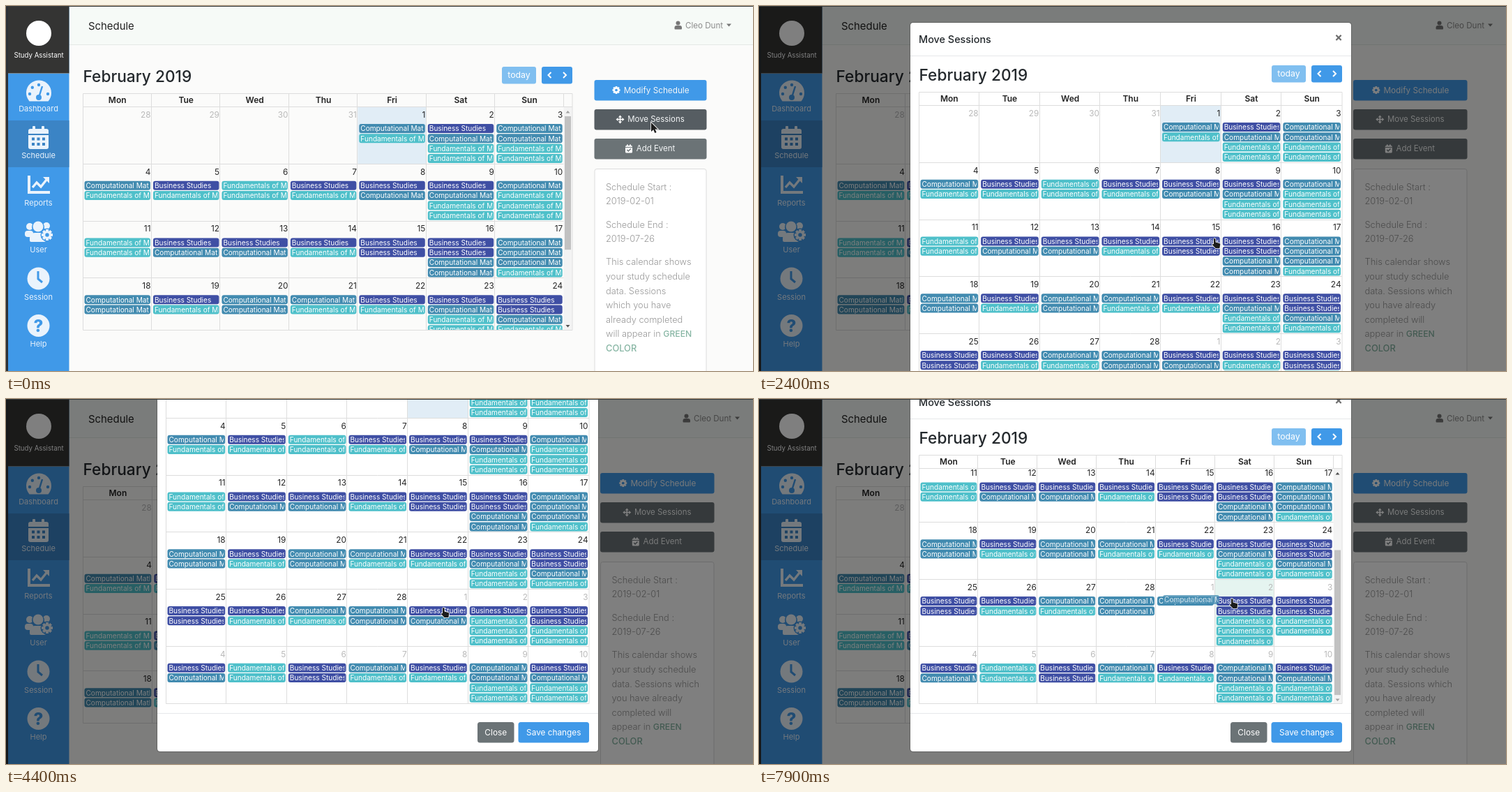
An HTML page with a canvas that plays this animation: 1071x523 px, repeating every 8000 ms.

```html
<!DOCTYPE html>
<html lang="en">
<head>
<meta charset="utf-8">
<title>Study schedule</title>
<style>
html, body { margin: 0; width: 100%; height: 100%; overflow: hidden; background: #fbfbfa; }
canvas { display: block; }
</style>
</head>
<body>
<canvas id="stage" width="1071" height="523"></canvas>
<script>
const ctx = document.getElementById('stage').getContext('2d');
const W = 1071, H = 523, LOOP = 8000, STEP = 100;
const BLUE = '#4099e8', PALE = '#eaf3fc', GREY = '#6b7376', LINE = '#dddddd';

const SUBJECTS = {
  C: ['Computational Mathematics', '#428bb0'],
  B: ['Business Studies', '#3f4fa4'],
  F: ['Fundamentals of Mathematics', '#4fc0ca']
};
const parse = rows => rows.map(r => r.split(','));
const BEFORE = parse([
  ',,,,CF,BCFF,CCFF',
  'CF,BF,FF,BF,BC,BCFF,CFFF',
  'FF,BC,BC,BF,BB,BBCC,CCCF',
  'CC,BF,CC,CF,BF,BCFF,BBCF',
  'BB,BF,CF,CC,BC,BFFF,BBFF',
  'BC,FF,BB,CF,BF,CCFF,BCFF'
]);
const AFTER = BEFORE.map(w => w.slice());
AFTER[4][4] = 'C';
AFTER[4][5] = 'BBFFF';

// Timelines: [time, value, ...]
const CURSOR = [
  [1300, 925, 167], [1700, 820, 290], [1900, 820, 290], [2200, 690, 317], [2400, 651, 333],
  [2500, 651, 333], [3200, 629, 329], [3400, 629, 329], [4200, 625, 299], [4500, 625, 299],
  [5400, 700, 303], [6300, 614, 401], [6400, 614, 403], [6600, 614, 403], [7400, 616, 289],
  [7700, 616, 289], [7800, 640, 288], [7900, 676, 286]
];
const SCROLL = [[2500, 0], [3200, 24], [3300, 24], [3400, 42], [4200, 197], [5400, 197], [5500, 43]];
const INNER = [[6500, 0], [6600, 2], [7400, 168]];
const LAG = [[7700, 0, 0], [7900, 8, -2]];
const ENTER = [[800, 0, -50], [900, .3, -35], [1000, .75, -12], [1100, 1, 0]];

function at(keys, t) {
  if (t <= keys[0][0]) return keys[0].slice(1);
  for (let i = 1; i < keys.length; i++) {
    const a = keys[i - 1], b = keys[i];
    if (t <= b[0]) {
      const p = (t - a[0]) / (b[0] - a[0]);
      return a.slice(1).map((v, j) => v + (b[j + 1] - v) * p);
    }
  }
  return keys[keys.length - 1].slice(1);
}

function rect(x, y, w, h, fill) {
  ctx.fillStyle = fill;
  ctx.fillRect(x, y, w, h);
}
function box(x, y, w, h, r, fill, stroke) {
  ctx.beginPath();
  ctx.roundRect(x, y, w, h, r);
  if (fill) { ctx.fillStyle = fill; ctx.fill(); }
  if (stroke) { ctx.strokeStyle = stroke; ctx.lineWidth = 1; ctx.stroke(); }
}
function disc(x, y, r, fill) {
  ctx.beginPath();
  ctx.arc(x, y, r, 0, 7);
  ctx.fillStyle = fill;
  ctx.fill();
}
function line(points, color, width = 1) {
  ctx.beginPath();
  points.forEach(([x, y]) => ctx.lineTo(x, y));
  ctx.strokeStyle = color;
  ctx.lineWidth = width;
  ctx.stroke();
}
function poly(points, fill) {
  ctx.beginPath();
  points.forEach(([x, y]) => ctx.lineTo(x, y));
  ctx.fillStyle = fill;
  ctx.fill();
}
function text(s, x, y, size, color, weight = 400, align = 'left') {
  ctx.font = `${weight} ${size}px Inter, sans-serif`;
  ctx.textAlign = align;
  ctx.fillStyle = color;
  ctx.fillText(s, x, y + size * .36);
}
function cog(x, y, r, fill, hole) {
  ctx.save();
  ctx.translate(x, y);
  for (let i = 0; i < 4; i++) {
    rect(-r, -r * .24, 2 * r, r * .48, fill);
    ctx.rotate(Math.PI / 4);
  }
  ctx.restore();
  disc(x, y, r * .76, fill);
  disc(x, y, r * .34, hole);
}

const icons = {
  Dashboard() {
    ctx.beginPath();
    ctx.arc(47, 124.5, 18, Math.PI * .77, Math.PI * .23);
    ctx.closePath();
    ctx.fillStyle = PALE;
    ctx.fill();
    for (const a of [0, .25, .5, 1])
      disc(47 - 13 * Math.cos(a * Math.PI), 126 - 13 * Math.sin(a * Math.PI), 2.2, BLUE);
    line([[47, 131], [52, 115]], BLUE, 2.4);
    disc(47, 131, 4, BLUE);
  },
  Schedule() {
    const hole = '#3b84c5';
    box(32, 176, 29, 29, 3, PALE);
    box(38, 172, 4, 7, 1, PALE);
    box(51, 172, 4, 7, 1, PALE);
    rect(32, 183, 29, 2, hole);
    for (let i = 0; i < 6; i++) rect(37 + i % 3 * 7.5, 188.5 + (i / 3 | 0) * 7.5, 4, 4, hole);
  },
  Reports() {
    line([[33, 243], [33, 267], [63, 267]], PALE, 4);
    line([[38, 260], [44, 253], [50, 259], [58, 249]], PALE, 3.4);
    poly([[53, 245], [62, 245], [62, 254]], PALE);
  },
  User() {
    disc(34, 316, 5, PALE);
    disc(58, 315, 5, PALE);
    box(27, 322, 12, 9, 4, PALE);
    disc(46, 317, 9, BLUE);
    disc(46, 316, 7.5, PALE);
    box(34, 325, 23, 13, [7, 7, 2, 2], PALE);
    disc(59, 328, 9.5, BLUE);
    cog(59, 328, 8, PALE, BLUE);
  },
  Session() {
    disc(46.5, 390.5, 16, PALE);
    line([[46, 380], [46, 391], [52, 396]], BLUE, 3);
  },
  Help() {
    disc(46.5, 458, 16, PALE);
    text('?', 46.5, 458, 24, BLUE, 800, 'center');
  }
};

function sidebar() {
  rect(0, 0, 3, H, '#2b3035');
  rect(3, 0, 87.5, H, BLUE);
  rect(3, 0, 87.5, 96, '#343433');
  rect(3, 96, 87.5, 1, '#7a8a94');
  rect(3, 164, 87.5, 67, '#3b84c5');
  disc(47, 39, 18, '#ffffff');
  text('Study Assistant', 47, 71, 9.7, '#ffffff', 400, 'center');
  Object.keys(icons).forEach((name, i) => {
    icons[name]();
    text(name, 46.5, 147 + i * 67.4, 11, PALE, 400, 'center');
  });
}

function session(kind, x, y, w) {
  const [name, color] = SUBJECTS[kind];
  ctx.save();
  box(x, y, w, 13, 3, color);
  ctx.beginPath();
  ctx.rect(x + 1, y, w - 3, 13);
  ctx.clip();
  text(name, x + 2, y + 6.7, 10.1, '#ffffff');
  ctx.restore();
}

function chevron(x, y, d) {
  line([[x - 2 * d, y - 4], [x + 2 * d, y], [x - 2 * d, y + 4]], '#ffffff', 2);
}

function scrollbar(x, top, bottom, scroll, content) {
  const view = bottom - top, track = view - 26, end = scroll + view >= content - 2;
  const tri = (y, d, off) => poly([[x - 3, y + 1.5 * d], [x + 3, y + 1.5 * d], [x, y - 2 * d]], off ? '#a3a3a3' : '#505050');
  rect(x - 6, top, 12, view, '#f3f3f3');
  rect(x - 4.5, top + 13 + scroll / content * track, 9, track * view / content, '#c1c1c1');
  tri(top + 7, 1, scroll <= 0);
  tri(bottom - 6, -1, end);
}

const rowHeight = week => 24.55 + 14.3 * Math.max(...week.map(d => d.length));
const total = weeks => weeks.reduce((sum, w) => sum + rowHeight(w), 0);

function calendar({ x, y, right, bottom, weeks, gutter = 0, scroll = 0, drag }) {
  const head = y + 38.5, body = y + 58, cw = (right - x - gutter) / 7;
  text('February 2019', x, y + 13.7, 22.7, '#24292d', 500);
  box(right - 101, y, 49, 24.5, 3, '#80bff0');
  text('today', right - 76.5, y + 12, 12.3, '#ffffff', 400, 'center');
  box(right - 44, y, 44, 24.5, 3, BLUE);
  chevron(right - 32.5, y + 12, -1);
  chevron(right - 11, y + 12, 1);
  ['Mon', 'Tue', 'Wed', 'Thu', 'Fri', 'Sat', 'Sun'].forEach((d, i) =>
    text(d, x + cw * (i + .5), y + 47.7, 12, '#222222', 600, 'center'));

  ctx.save();
  ctx.beginPath();
  ctx.rect(x, body, right - x, bottom - body);
  ctx.clip();
  let top = body - scroll, held;
  weeks.forEach((week, r) => {
    const h = rowHeight(week);
    week.forEach((day, c) => {
      const i = r * 7 + c, left = x + c * cw, muted = i < 4 || i > 31;
      if (i === 4) rect(left, top, cw, h, '#e1edf6');
      if (drag && drag.over && i === 33) rect(left, top, cw, h, '#e5f4f0');
      text(i < 4 ? 28 + i : i > 31 ? i - 31 : i - 3, left + cw - 1.5, top + 10.7, 11.8,
        muted ? '#b9b9b9' : '#242424', 400, 'right');
      [...day].forEach((kind, n) => session(kind, left + 2, top + 24 + n * 14.3, cw - 4));
      if (i === 32) held = [day[0], left + 2, top + 24];
    });
    top += h;
    line([[x, Math.round(top) - .5], [right - gutter, Math.round(top) - .5]], LINE);
  });
  for (let c = 1; c < 7; c++) {
    const cx = Math.round(x + c * cw) - .5;
    line([[cx, body], [cx, bottom]], LINE);
  }
  if (drag) {
    ctx.globalAlpha = .75;
    session(held[0], held[1] + drag.dx, held[2] + drag.dy, cw - 4);
    ctx.globalAlpha = 1;
  }
  if (gutter) scrollbar(right - 6.5, body, bottom, scroll, total(weeks));
  ctx.restore();

  for (let c = 1; c < (gutter ? 8 : 7); c++) {
    const cx = Math.round(x + c * cw) - .5;
    line([[cx, head], [cx, body]], LINE);
  }
  line([[x, body - .5], [right, body - .5]], LINE);
  box(x, head, right - x, Math.round(bottom) - .5 - head, 0, null, LINE);
}

function sideButton(x, y, w, label, fill, size, iconDx, icon) {
  const mid = x + w / 2;
  box(x, y, w, 29.5, 3, fill);
  icon(mid + iconDx, y + 14.5);
  text(label, mid + iconDx + 10.7, y + 14.3, size, '#f4f6f7');
}
function moveIcon(x, y) {
  line([[x - 4, y], [x + 4, y]], '#ffffff', 1.6);
  line([[x, y - 4], [x, y + 4]], '#ffffff', 1.6);
  for (const [a, b] of [[1, 0], [-1, 0], [0, 1], [0, -1]])
    poly([[x + a * 6, y + b * 6], [x + a * 3 + b * 2.6, y + b * 3 + a * 2.6], [x + a * 3 - b * 2.6, y + b * 3 - a * 2.6]], '#ffffff');
}
function checkIcon(x, y) {
  box(x - 5, y - 4.5, 10, 10.5, 1.5, '#ffffff');
  rect(x - 3, y - 6, 2, 2.5, '#ffffff');
  rect(x + 1, y - 6, 2, 2.5, '#ffffff');
  rect(x - 5, y - 2.6, 10, 1, GREY);
  line([[x - 2.5, y + 1.5], [x - .7, y + 3.5], [x + 2.7, y]], GREY, 1.4);
}

function page(t) {
  const wide = t >= 400, x = wide ? 852 : 843.5, w = wide ? 163.5 : 161, user = wide ? 12 : 0;
  rect(0, 0, W, H, '#fbfbfa');
  rect(90, 0, W - 90, 55, '#f6faf7');
  rect(90, 55, W - 90, 1, '#e4e9e5');
  text('Schedule', 118, 28.5, 14.9, '#222222');
  disc(963.5 + user, 24.5, 3, '#777777');
  box(958.5 + user, 28, 10.5, 5.5, [3, 3, 1, 1], '#777777');
  text('Cleo Dunt', 974 + user, 28, 11.6, '#8c8c8c');
  poly([[1033 + user, 25.5], [1040 + user, 25.5], [1036.5 + user, 29.5]], '#777777');
  sidebar();

  calendar({ x: 110.5, y: 87, right: wide ? 821.5 : 812, bottom: 464.5, weeks: BEFORE, gutter: 12.3 });

  const focus = wide && t < 1000;
  sideButton(x, 106, w, 'Modify Schedule', BLUE, 11.75, -49, (a, b) => cog(a, b, 5.5, '#ffffff', BLUE));
  if (focus) box(x - 1.5, 146.5, w + 3, 33, 5, '#b5babd');
  sideButton(x, 148, w, 'Move Sessions', t < 1000 ? '#565d62' : GREY, 11.45, -43.5, moveIcon);
  sideButton(x, 190, w, 'Add Event', GREY, 11.5, -31, checkIcon);

  box(x + .5, 233.5, w - 1, 320, 3, '#ffffff', '#dcdcdc');
  const para = (wide
    ? 'data. Sessions which|you have already|completed will|appear in |COLOR'
    : 'data. Sessions|which you have|already completed|will appear in |COLOR').split('|');
  const lines = ['Schedule Start :', '2019-02-01', 'Schedule End :', '2019-07-26',
    'This calendar shows', 'your study schedule', ...para];
  lines.forEach((s, i) => {
    const y = 259 + i * 20.6 + (i > 1 ? 12.7 : 0) + (i > 3 ? 12.7 : 0), last = i === lines.length - 1;
    text(s, x + 16.5, y, 12.8, last ? '#86b5a3' : '#989898', last ? 500 : 300);
    if (i === lines.length - 2)
      text('GREEN', x + 16.5 + ctx.measureText(s).width, y, 12.2, '#86b5a3', 500);
  });
}

function button(x, y, w, label, fill, size) {
  box(x, y, w, 29.5, 3.5, fill);
  text(label, x + w / 2, y + 14.6, size, '#ffffff', 400, 'center');
}

function modal(t) {
  const [alpha, slide] = at(ENTER, t);
  if (!alpha) return;
  const dy = slide - Math.round(at(SCROLL, t)[0]);
  const dropped = t >= 5500, weeks = dropped ? AFTER : BEFORE;
  const y = 85 + dy, bottom = Math.round(dropped ? y + 395 : y + 58 + total(weeks));
  const cx = at(CURSOR, t)[0];
  let drag;
  if (t >= 4600 && t < 5500) {
    const [px, py] = at(CURSOR, t - STEP);
    drag = { dx: px - 625, dy: py - 299, over: cx > 662 };
  } else if (t >= 7800) {
    const [dx, ddy] = at(LAG, t);
    drag = { dx, dy: ddy, over: cx > 655 };
  }
  const top = 24 + dy, end = bottom + 68;
  ctx.save();
  ctx.globalAlpha = alpha;
  box(217, top, 632, end - top, 4, '#ffffff');
  box(216.5, top - .5, 633, end - top + 1, 4, null, 'rgba(0,0,0,.2)');
  text('Move Sessions', 229, 47.5 + dy, 14.4, '#24292d', 500);
  text('×', 831, 45 + dy, 17, '#6d6d6d', 700, 'center');
  rect(217, 71 + dy, 632, 1, '#e6e8ea');
  calendar({
    x: 229.5, y, right: 836, bottom, weeks, drag,
    gutter: dropped ? 12.3 : 0, scroll: Math.round(at(INNER, t)[0])
  });
  rect(217, bottom + 13, 632, 1, '#e6e8ea');
  button(676, bottom + 26, 52.5, 'Close', GREY, 11.85);
  button(734.5, bottom + 26, 101.5, 'Save changes', BLUE, 11.8);
  ctx.restore();
}

const ARROW = new Path2D('M0 0V13L3.2 10.2 5.3 15 7.6 14 5.5 9.4H9.5Z');
const HAND = new Path2D('M2 0C3.3 0 3.6 1 3.6 2V5.5L9 7C10 7.4 10.4 8 10.2 9L9.4 14H3.6L-.8 9.4C-1.4 8 0 7.4 1 8.4V2C1 .8 1.2 0 2 0Z');

function cursor(t) {
  const [x, y] = at(CURSOR, t);
  const hand = t >= 2400 && t < 2600 || t >= 4200 && t < 5500 || t >= 7500;
  const shape = hand ? HAND : ARROW;
  ctx.save();
  ctx.translate(x, y);
  ctx.strokeStyle = '#ffffff';
  ctx.lineWidth = 1.6;
  ctx.stroke(shape);
  ctx.fillStyle = '#1c1c1c';
  ctx.fill(shape);
  ctx.restore();
}

function frame(now) {
  const t = Math.floor(now % LOOP / STEP) * STEP;
  page(t);
  const shade = Math.min(1, Math.max(0, (t - 400) / 500)) * .5;
  rect(0, 0, W, H, `rgba(0,0,0,${shade})`);
  modal(t);
  rect(0, 0, W, 1, '#34393a');
  cursor(t);
}

const start = performance.now();
function tick() {
  frame(performance.now() - start);
  requestAnimationFrame(tick);
}
tick();
</script>
</body>
</html>
```
